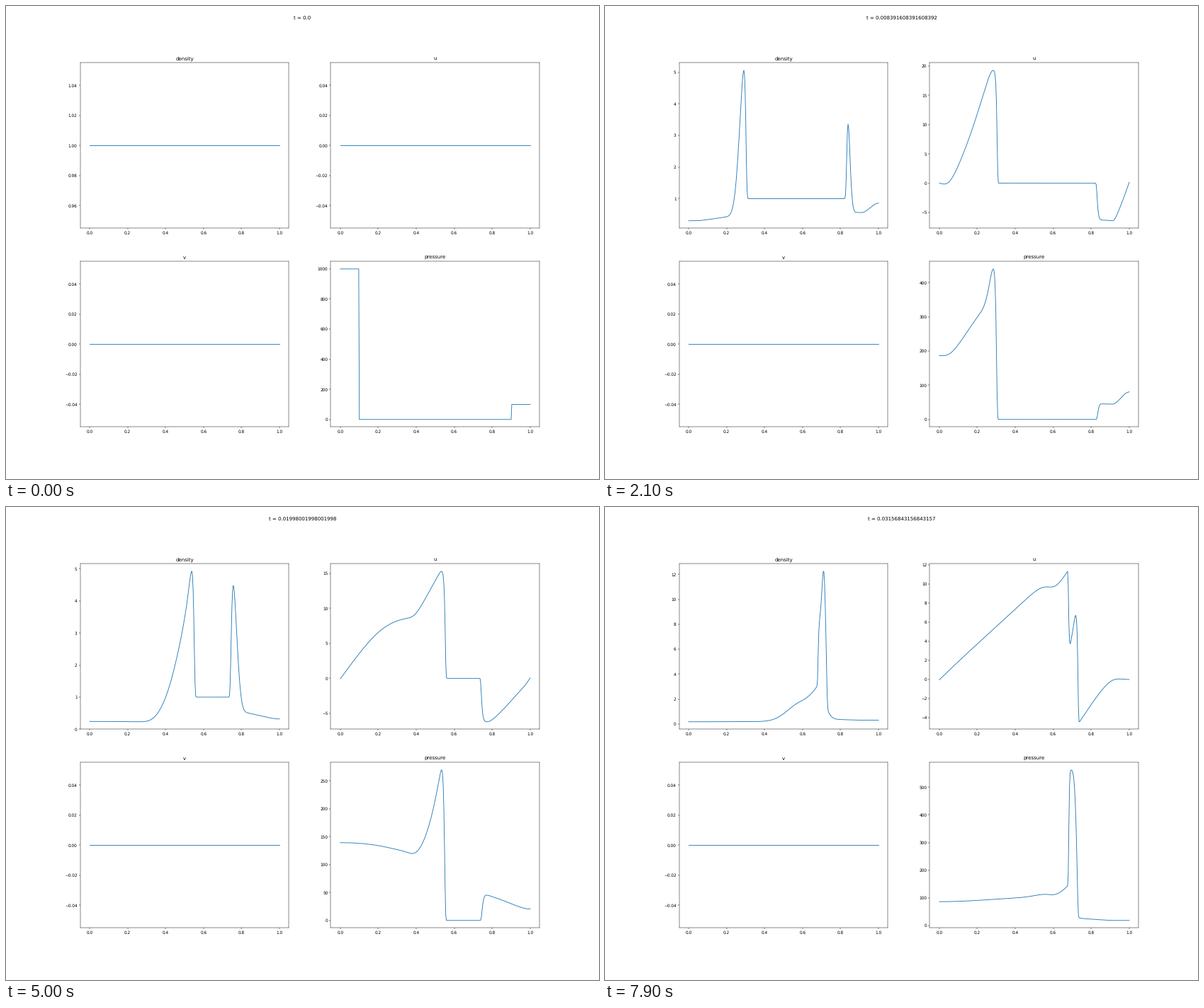
A matplotlib script for the animation above (8000 ms loop, 837 by 669 pixels).

```python
import numpy as np
import matplotlib.pyplot as plt
from matplotlib.animation import FuncAnimation

plt.rcParams["text.hinting"] = "none"

W, H, DPI = 837, 669, 41.85
GAMMA = 1.4
CELLS = 300
FRAMES, SKIP = 80, 10
times = np.linspace(0, 0.04, 1002)
dt = times[1]
x = np.linspace(0, 1, CELLS)
dx = x[1]


def primitive(q):
    rho, mom, energy = q
    u = mom / rho
    return rho, u, (GAMMA - 1) * (energy - 0.5 * mom * u)


def hllc(q):
    """HLLC flux between each pair of neighbouring cells."""
    rho, u, p = primitive(q)
    c = np.sqrt(GAMMA * p / rho)
    f = np.array([q[1], q[1] * u + p, u * (q[2] + p)])
    lo, hi = slice(None, -1), slice(1, None)
    s_l = np.minimum(u[lo] - c[lo], u[hi] - c[hi])
    s_r = np.maximum(u[lo] + c[lo], u[hi] + c[hi])
    m_l = rho[lo] * (s_l - u[lo])
    m_r = rho[hi] * (s_r - u[hi])
    s_m = (p[hi] - p[lo] + m_l * u[lo] - m_r * u[hi]) / (m_l - m_r)

    def star(side, s, m):
        r = m / (s - s_m)
        e = q[2, side] / rho[side] + (s_m - u[side]) * (s_m + p[side] / m)
        return f[:, side] + s * (np.array([r, r * s_m, r * e]) - q[:, side])

    inner = np.where(s_m >= 0, star(lo, s_l, m_l), star(hi, s_r, m_r))
    return np.where(s_l >= 0, f[:, lo], np.where(s_r <= 0, f[:, hi], inner))


def reflect(q):
    for ghost, cell in ((0, 1), (-1, -2)):
        q[:, ghost] = q[0, cell], -q[1, cell], q[2, cell]


def simulate():
    """Two interacting blast waves between solid walls."""
    p = np.where(x < 0.1, 1000.0, np.where(x > 0.9, 100.0, 0.01))
    q = np.array([np.ones(CELLS), np.zeros(CELLS), p / (GAMMA - 1)])
    new = q.copy()
    shots = [primitive(q.copy())]
    for step in range(1, (FRAMES - 1) * SKIP + 1):
        reflect(q)
        flux = hllc(q)
        new[:, 1:-1] = q[:, 1:-1] - dt / dx * (flux[:, 1:] - flux[:, :-1])
        q, new = new, q
        if step % SKIP == 0:
            shots.append(primitive(q.copy()))
    return shots


shots = simulate()
fig, axes = plt.subplots(2, 2, figsize=((W + 0.01) / DPI, (H + 0.01) / DPI), dpi=DPI)
title = fig.suptitle("t = 0.0")
lines = []
for ax, name in zip(axes.flat, ("density", "u", "v", "pressure")):
    ax.set_title(name)
    lines += ax.plot(x, np.zeros(CELLS))


def update(i):
    rho, u, p = shots[i]
    for line, y in zip(lines, (rho, u, np.zeros(CELLS), p)):
        line.set_ydata(y)
        line.axes.relim()
        line.axes.autoscale_view()
    title.set_text(f"t = {float(times[i * SKIP])}")
    return lines


anim = FuncAnimation(fig, update, frames=FRAMES, interval=100,
                     repeat=True, repeat_delay=0, blit=False)
plt.show()
```
